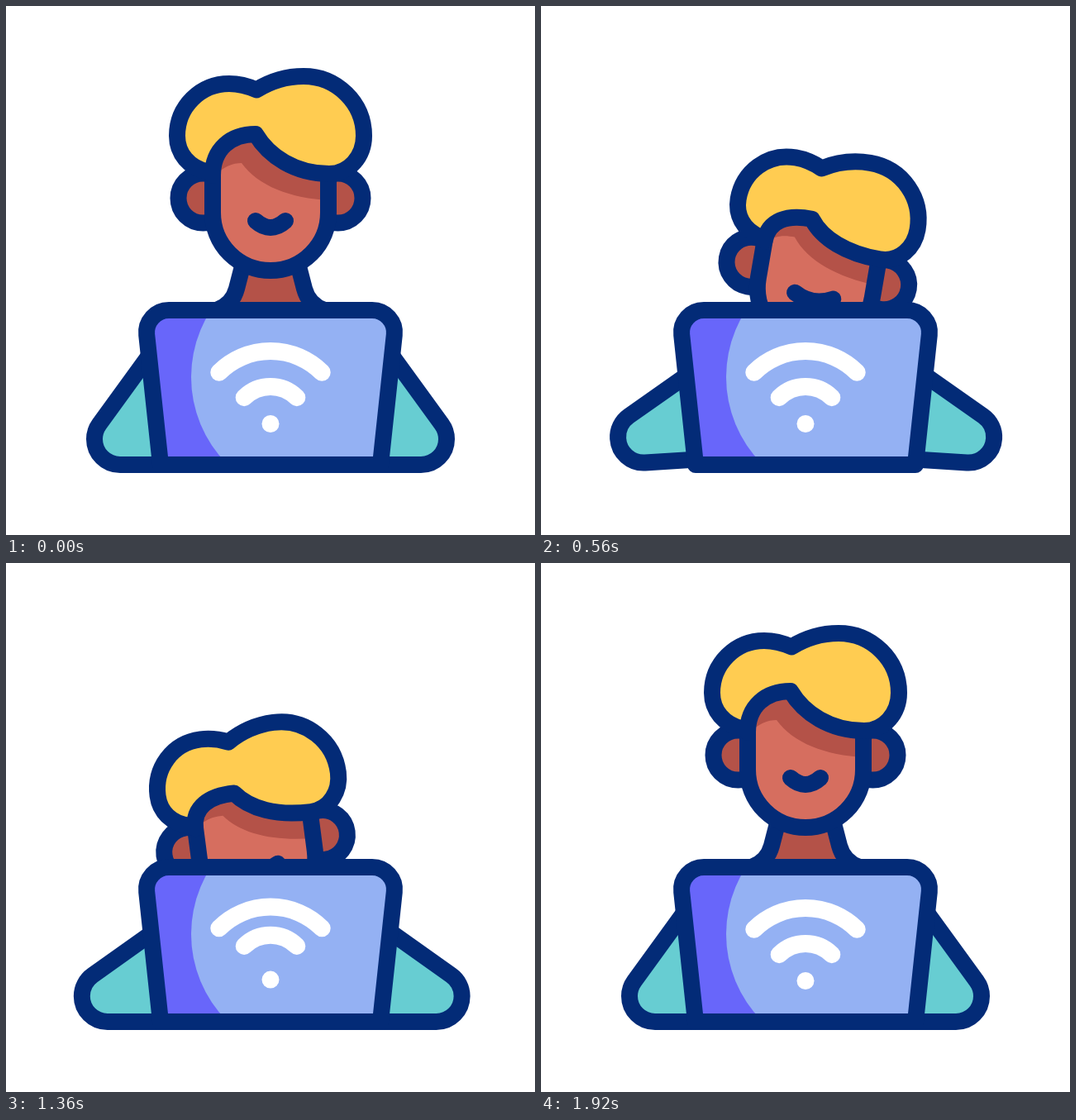
Recreate the animation shown at these times as an HTML page with a canvas. Size 640 by 640 pixels, loop 2 s.

```html
<!DOCTYPE html>
<html lang="en">
<head>
<meta charset="utf-8">
<title>Working at a laptop</title>
<style>
html, body { margin: 0; width: 100%; height: 100%; overflow: hidden; background: #fff; }
canvas { display: block; width: 640px; height: 640px; }
</style>
</head>
<body>
<canvas id="stage" width="640" height="640"></canvas>
<script>
const ctx = document.getElementById('stage').getContext('2d');
const LOOP = 2000, STEP = 40, RAD = Math.PI / 180;
const NAVY = '#032b77', SKIN = '#d66e5f', SHADE = '#b45248', HAIR = '#ffcc51';
const TEAL = '#67cdd2', BLUE = '#94b1f3', VIOLET = '#6866fa';

// time, head x, head y, head tilt, arm spread, nod
const keys = [
  [90, 0, 0, 0, 0, 0],
  [400, 11, 67.5, 6.7, .74, .68],
  [580, 15, 92, 9.8, 1, 1],
  [880, 4.5, 97, 5, 1, 1],
  [1300, -18, 108, -7.6, 1, 1],
  [1360, -18, 107, -7.4, .98, .98],
  [1600, -8.5, 50, -3.5, .45, .65],
  [1760, -2, 12, -.8, .1, .2],
  [1920, 0, 0, 0, 0, 0]
];

const rate = (i, c) => (keys[i + 1][c] - keys[i][c]) / (keys[i + 1][0] - keys[i][0]);

function slope(i, c) {
  if (i === 0 || i === keys.length - 1) return 0;
  const a = rate(i - 1, c), b = rate(i, c);
  return a * b > 0 ? 2 * a * b / (a + b) : 0;
}

// Monotone cubic between the key poses
function track(t, c) {
  const last = keys.length - 1;
  if (t <= keys[0][0]) return keys[0][c];
  if (t >= keys[last][0]) return keys[last][c];
  let i = 0;
  while (t > keys[i + 1][0]) i++;
  const h = keys[i + 1][0] - keys[i][0], u = (t - keys[i][0]) / h, v = 1 - u;
  return keys[i][c] * (1 + 2 * u) * v * v + keys[i + 1][c] * u * u * (3 - 2 * u)
    + h * u * v * (slope(i, c) * v - slope(i + 1, c) * u);
}

// Repeated smooth bump from 0 to 1 and back
function pulse(t, start, period, count) {
  const u = (t - start) / period;
  return u > 0 && u < count ? (1 - Math.cos(2 * Math.PI * u)) / 2 : 0;
}

function paint(fill, stroke = NAVY, width = 20) {
  if (fill) { ctx.fillStyle = fill; ctx.fill(); }
  if (stroke) { ctx.strokeStyle = stroke; ctx.lineWidth = width; ctx.stroke(); }
}

function disc(x, y, r) {
  ctx.beginPath();
  ctx.arc(x, y, r, 0, 2 * Math.PI);
}

function arm(x, spread, lift, mirrored) {
  const y = 524 - 3.3 * lift, r = 31;
  const rise = (54 - 19 * spread) * RAD, tilt = 4.7 * RAD * lift;
  const from = Math.PI / 2 - tilt, to = 1.5 * Math.PI - rise;
  const ex = x + r * Math.cos(to), ey = y + r * Math.sin(to);
  ctx.save();
  if (mirrored) { ctx.translate(640, 0); ctx.scale(-1, 1); }
  ctx.beginPath();
  ctx.moveTo(235, y + r * Math.sin(from) - (235 - x) * Math.tan(tilt));
  ctx.arc(x, y, r, from, to);
  ctx.lineTo(195, ey - (195 - ex) * Math.tan(rise));
  ctx.lineTo(235, 440);
  ctx.closePath();
  paint(TEAL);
  ctx.restore();
}

function neck(drop) {
  ctx.save();
  ctx.translate(0, drop);
  ctx.beginPath();
  ctx.moveTo(286, 315);
  ctx.lineTo(279, 342);
  ctx.quadraticCurveTo(274, 361, 255, 368);
  ctx.lineTo(385, 368);
  ctx.quadraticCurveTo(366, 361, 361, 342);
  ctx.lineTo(354, 315);
  paint(SHADE);
  ctx.restore();
}

function fringeLeft(n) {
  ctx.bezierCurveTo(250, 173 + 6 * n, 272, 155 + 13 * n, 302, 155 + 14 * n);
}

function fringeRight(n) {
  ctx.bezierCurveTo(318, 182 + 8 * n, 350, 203, 391, 203);
}

function face(n) {
  ctx.beginPath();
  ctx.moveTo(250, 205);
  fringeLeft(n);
  fringeRight(n);
  ctx.lineTo(390, 250);
  ctx.arc(320, 250, 70, 0, Math.PI);
  ctx.closePath();
  ctx.save();
  paint(SKIN, null);
  ctx.clip();
  ctx.beginPath();
  ctx.moveTo(250, 140);
  ctx.lineTo(250, 208);
  ctx.bezierCurveTo(262, 194, 275, 190 + 4 * n, 285, 190 + 4 * n);
  ctx.bezierCurveTo(305, 218 + 2 * n, 345, 233, 392, 235);
  ctx.lineTo(392, 140);
  paint(SHADE, null);
  ctx.restore();
  ctx.beginPath();
  ctx.moveTo(250, 205);
  ctx.lineTo(250, 250);
  ctx.arc(320, 250, 70, Math.PI, 0, true);
  ctx.lineTo(390, 205);
  paint(null);

  const half = 18 + 5.5 * n;
  ctx.beginPath();
  ctx.moveTo(320 - half, 260);
  ctx.quadraticCurveTo(320, 276 - 3 * n, 320 + half, 260);
  paint(null);
}

function hair(n) {
  const d = 5 * n, s = 3 * n;
  ctx.beginPath();
  ctx.moveTo(302, 155 + 14 * n);
  fringeRight(n);
  ctx.bezierCurveTo(415, 203, 433 - s, 182, 433 - s, 157 + s);
  ctx.bezierCurveTo(433 - s, 117 + d, 400, 85 + d, 360, 85 + d);
  ctx.bezierCurveTo(340, 85 + d, 320, 91 + d, 303, 101.5 + d);
  ctx.bezierCurveTo(293, 97 + d, 282, 94 + d, 270, 94 + d);
  ctx.bezierCurveTo(235, 94 + d, 207 + s, 122 + d, 207 + s, 157 + s);
  ctx.bezierCurveTo(207 + s, 178, 221, 196, 245, 201);
  ctx.lineTo(250, 205);
  fringeLeft(n);
  ctx.closePath();
  paint(HAIR);
}

function head(x, y, tilt, n) {
  ctx.save();
  ctx.translate(320 + x, 232 + y);
  ctx.rotate(tilt * RAD);
  ctx.translate(-320, -232);
  for (const ear of [238.5, 401.5]) {
    disc(ear, 232.5, 30);
    paint(SHADE);
  }
  face(n);
  hair(n);
  ctx.restore();
}

function laptop() {
  ctx.beginPath();
  ctx.moveTo(187, 555);
  ctx.arcTo(167, 368, 320, 368, 27);
  ctx.arcTo(473, 368, 453, 555, 27);
  ctx.lineTo(453, 555);
  ctx.closePath();
  const edge = () => paint(null);
  ctx.save();
  paint(VIOLET, null);
  ctx.clip();
  disc(373, 449, 149);
  paint(BLUE, null);
  ctx.restore();
  ctx.beginPath();
  ctx.moveTo(187, 555);
  ctx.arcTo(167, 368, 320, 368, 27);
  ctx.arcTo(473, 368, 453, 555, 27);
  ctx.lineTo(453, 555);
  ctx.closePath();
  edge();
}

function signalArc(r, lift) {
  ctx.beginPath();
  ctx.arc(320, 505.5 - lift, r, -135 * RAD, -45 * RAD);
  paint(null, '#fff', 21);
}

function draw(t) {
  const [x, y, tilt, spread, nod] = [1, 2, 3, 4, 5].map(c => track(t, c));
  const tapL = pulse(t, 480, 240, 3), tapR = pulse(t, 400, 240, 4);
  const hop = 20 * pulse(t, 623, 385, 2), hopMid = 20 * pulse(t, 688, 385, 2);

  ctx.fillStyle = '#fff';
  ctx.fillRect(0, 0, 640, 640);
  ctx.lineCap = ctx.lineJoin = 'round';

  arm(138 - 15.5 * spread + 2 * tapL, spread, tapL, false);
  arm(138 - 19 * spread + 5 * tapR, spread, tapR, true);
  neck(.2 * y);
  head(x, y, tilt, nod);
  laptop();
  signalArc(88, hop);
  signalArc(45, hopMid);
  disc(320, 505.5 - hop, 10.5);
  paint('#fff', null);
}

const begin = performance.now();
function tick() {
  const t = (performance.now() - begin) % LOOP;
  draw(Math.floor(t / STEP) * STEP);
  requestAnimationFrame(tick);
}
tick();
</script>
</body>
</html>
```
